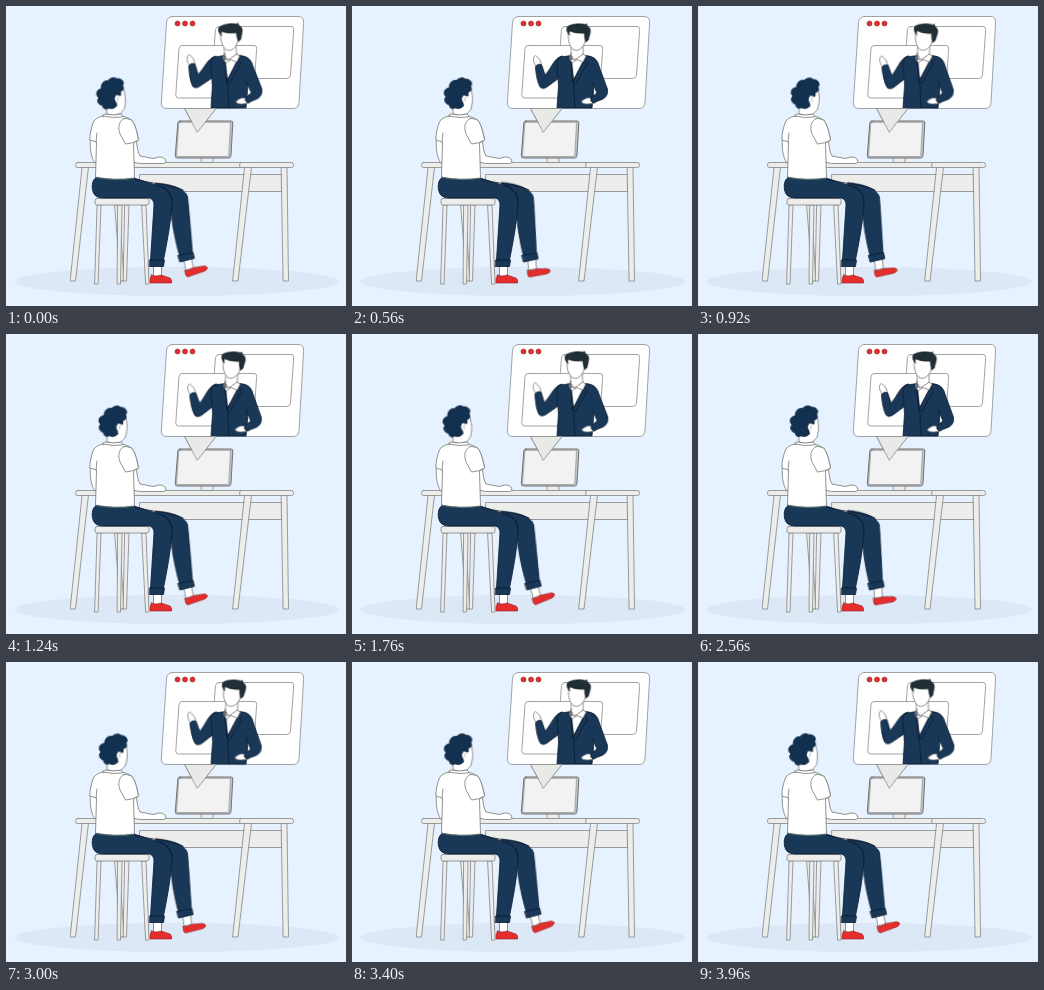
These frames come from a looping animation (340 px wide and 300 px high, 4 s). An HTML page:

```html
<!DOCTYPE html>
<html lang="en">
<head>
<meta charset="utf-8">
<title>Video lesson</title>
<style>
  html, body { margin: 0; width: 100%; height: 100%; overflow: hidden; background: #e6f2ff; }
  svg { display: block; width: 100%; height: 100%; }
  .wood { fill: #ededeb; stroke: #858585; stroke-width: .8; }
  .panel { fill: #fff; stroke: #8d8d8d; stroke-width: .8; }
  .skin { fill: #fff; stroke: #777; stroke-width: .8; }
  .navy { fill: #193757; stroke: #0c1c30; stroke-width: .8; }
  .hair { fill: #12304f; stroke: #0c1c30; stroke-width: .6; }
  .red { fill: #e52d2d; stroke: #8d2327; stroke-width: .6; }
  .line { fill: none; stroke: #0c1c30; stroke-width: .8; }
  path, rect { stroke-linejoin: round; stroke-linecap: round; }

  /* Every part swings about its own joint, one way per second. */
  .swing {
    transform-origin: var(--x) var(--y);
    animation: swing 1s cubic-bezier(.37, 0, .63, 1) var(--delay, 0s) infinite alternate;
  }
  @keyframes swing {
    from { transform: rotate(calc(-1 * var(--turn))); }
    to { transform: rotate(var(--turn)); }
  }
  .student-head { --x: 107px; --y: 108px; --turn: 3.6deg; }
  .teacher-head { --x: 225px; --y: 50px; --turn: 3deg; }
  .teacher-body { --x: 224px; --y: 102px; --turn: .35deg; }
  .raised-arm { --x: 209px; --y: 53px; --turn: -2.3deg; }
  .low-arm { --x: 241px; --y: 54px; --turn: .8deg; }
  .shin { --x: 172px; --y: 185px; --turn: 1.4deg; --delay: -.38s; }
  .foot { --x: 181px; --y: 258px; --turn: 5deg; --delay: -.38s; }
  .shin, .foot { animation-direction: alternate; }
  .shin { --turn: -1.4deg; }
  .foot { --turn: -5deg; }
  .shin, .foot { animation-name: kick; }
  @keyframes kick {
    from { transform: rotate(var(--turn)); }
    to { transform: rotate(calc(-1 * var(--turn))); }
  }
</style>
</head>
<body>
<svg viewBox="0 0 340 300" preserveAspectRatio="none">
  <ellipse cx="171" cy="275.5" rx="162.5" ry="14.5" fill="#dce8f5"/>

  <!-- call window -->
  <path class="panel" d="M167 10.5H292Q298 10.5 297.6 16.5L293 96.500Q292.500 102.500 287 102.500H161Q155 102.500 155.400 96.500L160.500 16.500Q161 10.500 167 10.500Z"/>
  <g class="red">
    <circle cx="171.500" cy="17.500" r="2.500"/>
    <circle cx="179" cy="17.500" r="2.500"/>
    <circle cx="186.500" cy="17.500" r="2.500"/>
  </g>
  <path class="panel" d="M213 20.500H285Q288 20.500 287.700 23.500L284.500 69Q284 72.500 280.500 72.500H209Q205.500 72.500 206 69L209.500 23.500Q210 20.500 213 20.500Z"/>
  <path class="panel" d="M176.500 39.500H248Q251 39.500 250.700 42.500L247.500 88.500Q247 92 243.500 92H172.500Q169.500 92 169.800 88.500L173 42.500Q173.300 39.500 176.500 39.500Z"/>

  <!-- teacher -->
  <g class="swing teacher-body">
    <g class="swing raised-arm">
      <path class="skin" d="M184 60C181 56 181 52 182 50.500Q183.500 48.500 185 50.500L188 54Q190 57 188.500 61Z"/>
      <path class="navy" d="M210 50C202 52 200 61 193 69L189.500 58.500Q186 57 183.300 60.500C184 68 185 76 188 81Q191 84 196 80L211 69Z"/>
    </g>
    <path class="navy" d="M219 49.500L209 51Q204.500 52 205 58L206.500 80L205 102H240L242 80L244 56Q243 51 234 49.500Z"/>
    <path class="skin" d="M219.500 51L221.500 74L232 53Z"/>
    <path class="navy" d="M218.500 52L221.500 74L233 53L235 58L224 77L221 76Z" stroke="none"/>
    <path class="line" d="M221.500 74L223 101"/>
    <g class="swing low-arm">
      <path class="skin" d="M242 92L235 92Q230 94 229.500 96Q231 98.500 236 98L243 97Z"/>
      <path class="navy" d="M235 50Q243 50 246 57C249 66 253 76 255.500 83Q256.500 90 251 93L241 97Q238 95 239 91.500L245 87L240 75"/>
    </g>
    <g class="swing teacher-head">
      <path class="skin" d="M219 40V49L223 55L231 49V38Z"/>
      <path class="skin" d="M216.500 25C215 33 217 40 221 43.500Q226 46 230 41C233 38 234.500 32 234 24Z"/>
      <path d="M217 29C214 26 213.500 22 215.500 20.500C220 17.500 228 17 233 18.500L234 17.500L235 20Q239 22 237.800 27L236 34L233.500 36Q232 31 232 27Q224 28 217 25Z" fill="#202e36" stroke="#111b22" stroke-width=".6"/>
    </g>
    <path class="skin" d="M219 47.500L218 54L224 53L231 48L234 50L231 56L224.500 53.500L220 57L217.500 52Z"/>
  </g>

  <!-- monitor and desk -->
  <path d="M179 102.500H210L191.500 126Z" fill="#e9e9e8" stroke="#8d8d8d" stroke-width=".8"/>
  <path class="wood" d="M195.500 151H207V156.500H195.500Z"/>
  <path d="M174 115H225Q227 115 226.800 117L225 149.500Q224.800 152 222.500 152H171.500Q169 152 169.300 149.500L171.800 117Q172 115 174 115Z" fill="#c2c4c6" stroke="#666" stroke-width=".9"/>
  <path d="M174 116.300H223.500Q224.500 116.300 224.400 118L222.800 148.500Q222.600 150.500 221 150.500H172Q170.500 150.500 170.700 148.500L172.800 118Q173 116.300 174 116.300Z" fill="#f2f2f2" stroke="#888" stroke-width=".6"/>
  <path d="M179 102.500H210L191.500 126Z" fill="#e9e9e8" stroke="#8d8d8d" stroke-width=".8"/>
  <g class="wood">
    <path d="M134 168.500H276V185.500H134Z"/>
    <path d="M275.500 161H281L282.500 275H277.500Z"/>
    <path d="M239 161H245.500L232 275H227Z"/>
    <path d="M76.500 161H82.500L69.500 275H64.500Z"/>
    <rect x="69.500" y="156.500" width="218" height="5" rx="2"/>
    <path d="M235 156.500Q232 159 234.500 161.500" fill="none"/>
  </g>

  <!-- stool -->
  <g class="wood">
    <path d="M109 199H113L118 275H115Z"/>
    <path d="M112 199H116L114.500 278H111.500Z"/>
    <path d="M119 199H123L120.500 275H117.500Z"/>
    <path d="M91.500 199H95L92 278H89Z"/>
    <path d="M136 199H140L143 278H140Z"/>
    <rect x="89" y="192.500" width="54" height="6.500" rx="2"/>
  </g>

  <!-- student: legs -->
  <g class="swing shin">
    <g class="swing foot">
      <path class="skin" d="M177 253L179 264L186.500 262L185 252Z"/>
      <path class="red" d="M178 264.500Q182 265 187 262L197 260.800Q201 261 200.500 263.500Q199 266 194 267L180.500 271Q178 270 178 264.500Z"/>
    </g>
    <path class="navy" d="M150 177C164 178 179 182 181.500 191C183 207 184.500 228 186 248L173 250C168 232 165 213 164 195L150 190Z"/>
    <path class="navy" d="M171.500 249.500L186.500 246.500L187.800 252.500L173.500 256Z"/>
  </g>
  <path class="skin" d="M147.500 258V271H155.500V258Z"/>
  <path class="red" d="M145.500 269Q150 271 155 269L164 272Q166.500 274 165.500 277H144Q143.500 272 145.500 269Z"/>
  <path class="navy" d="M90 171.500Q85 175 86.500 184Q88 192 97 192H143Q148 193 148 199L144.500 254H157.500C161 237 165 215 166 198Q167 187 156 181L128 172Z"/>
  <path class="line" d="M128 173C146 178 164 178 177 184M166 198C166 188 162 183 154 180"/>
  <path class="navy" d="M143.800 254H158.500L157.500 260.500H143.500Z"/>

  <!-- student: torso and arms -->
  <path class="skin" d="M84.500 132C83.500 142 85 150 88.500 157L91.500 155V133Z"/>
  <path class="skin" d="M120 136C121 145 122 151 126 155Q129 157.500 137 157.500H158Q161 156.500 159.500 153.500Q157 150.500 153 151L147 152.500L134 150Q131 145 130.500 134Z"/>
  <path class="skin" d="M97 110Q89 112 87.500 116C85 122 84 128 83.800 134L90.500 136L89.500 171Q108 175 128.500 172L127.500 137L132.500 134C131 126 129 118 125.500 114Q121 111 116 110Z"/>
  <path class="skin" d="M118 112.500C112 116 112 122 114 128L119.500 138Q127 137.500 132.500 134C131 126 129 118 125.500 114Q121 112 118 112.500Z"/>
  <path d="M91 127L90 136" class="skin"/>
  <path d="M89.700 171.500Q108 175 128.500 172.300" fill="none" stroke="#4d6d67" stroke-width=".9"/>
  <g class="swing student-head">
    <path class="skin" d="M101 95V108Q107 111 115 108L116 106.500Q120 104 120 98C121 92 120 87 118.500 82L106 82Z"/>
    <path class="hair" d="M97 82C96 77 101 73.500 104 74.500C107 70.500 112 71.500 113 73C118 72.500 121 77 118.500 80Q120.500 85 116 86L116 90L111 89Q108 93 111 97L111.500 100Q108 104 103 102Q98 104.500 97 99C92.500 98 91 93 94 91C90 88 92 82 97 82Z"/>
    <path d="M112.500 89.500Q109 91 110.500 95Q112 98 115 96Q116 91 112.500 89.500Z" fill="#fff"/>
    <path d="M114 90.500Q111.500 92 113 95" fill="none" stroke="#777" stroke-width=".5"/>
  </g>
  <path class="skin" d="M97 110Q97 108 99 108Q107 110 115 108Q117 109 116 111Q107 112.500 97 110Z"/>
</svg>
</body>
</html>
```
